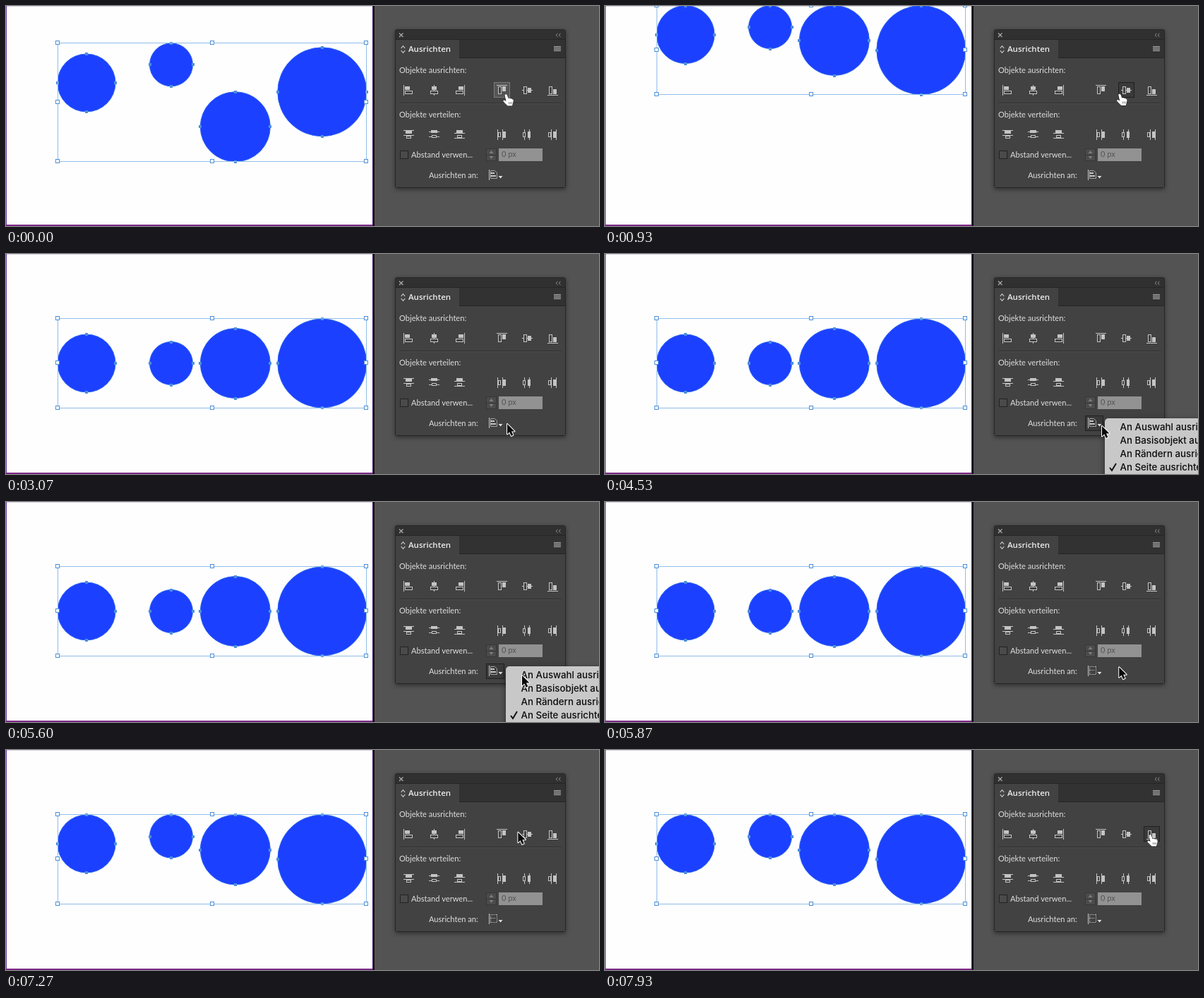
These frames come from a looping animation (840x312 px, 8 s). An HTML page with a canvas:

```html
<!DOCTYPE html>
<html lang="de">
<head>
<meta charset="utf-8">
<title>Ausrichten</title>
<style>
html, body { margin: 0; overflow: hidden; background: #535353; }
canvas { display: block; }
</style>
</head>
<body>
<canvas width="840" height="312"></canvas>
<script>
const ctx = document.querySelector('canvas').getContext('2d');
const LOOP = 8000;
const UI_FONT = '11.1px Lato, sans-serif';
const ICON = '#c4c4c4', PANEL = '#424242';

// Centre x, radius and scattered centre y of each circle
const circles = [[114, 41, 109], [234, 30.5, 83.3], [324.8, 49.5, 171.3], [447.8, 63, 121.8]];

// Pointer path: time, x, y
const pointerPath = [
  [0, 708, 125], [500, 708, 125], [1250, 742, 124], [2550, 742, 124],
  [3070, 710, 241], [3400, 704, 245], [3600, 704, 244], [4530, 704, 244],
  [4900, 721, 286], [5150, 728, 288], [5550, 731, 246], [5750, 731, 246],
  [6400, 700, 115], [7050, 700, 115], [7600, 772, 120], [LOOP, 772, 120]
];
const presses = [[0, 130], [2060, 2200], [6740, 6870]];
const MENU_OPEN = 3800, MENU_CLOSE = 5720;

const buttons = [];
[[119, alignIcon], [182, distributeIcon]].forEach(([y, icon], row) =>
  [570, 606, 642, 702, 738, 774].forEach((x, i) =>
    buttons.push({ x, y, icon, edge: i % 3, flip: (i < 3) === (row === 0) })));

const hand = new Path2D('M-1.5 1.5Q0-1.5 2 1.5L3.5 6Q5.5 4.8 6.5 6.5Q8.3 5.6 9 7.4Q11 7 10.8 9.5L10 13L9 16.5H2.5L-3.5 10.5Q-4 8 -1.5 8.8L.5 10Z');
const arrow = new Path2D('M0 0V14.5L3.3 11.4L5.7 17L8.4 15.8L6 10.4H10.5Z');

function rect(x, y, w, h, color) {
  ctx.fillStyle = color;
  ctx.fillRect(x, y, w, h);
}

function frame(x, y, w, h, color) {
  ctx.strokeStyle = color;
  ctx.lineWidth = 1;
  ctx.strokeRect(x + .5, y + .5, w - 1, h - 1);
}

function text(string, x, y, font = UI_FONT, color = '#dedede') {
  ctx.font = font;
  ctx.fillStyle = color;
  ctx.fillText(string, x, y);
}

function stroke(d, color, width = 1) {
  ctx.strokeStyle = color;
  ctx.lineWidth = width;
  ctx.stroke(new Path2D(d));
}

function fill(d, color) {
  ctx.fillStyle = color;
  ctx.fill(new Path2D(d));
}

// Bar of an icon, relative to the button centre; flip swaps the axes
function bar(b, x, y, w, h, hollow) {
  const box = b.flip ? [b.x + y, b.y + x, h, w] : [b.x + x, b.y + y, w, h];
  rect(...box, hollow ? PANEL : ICON);
  if (hollow) frame(...box, ICON);
}

function alignIcon(b) {
  bar(b, -7, [-7, 0, 7][b.edge], 15, 1);
  const shape = (x, length, hollow) =>
    bar(b, x, [-5, -(length >> 1), 6 - length][b.edge], 5, length, hollow);
  shape(b.flip ? 1 : -5, 11, true);
  shape(b.flip ? -5 : 1, 7, false);
}

function distributeIcon(b) {
  [0, 1].forEach(i => {
    const line = -6 + 2 * b.edge + 7 * i;
    const hollow = b.flip ? i === 0 : i === 1;
    bar(b, -7, line, 15, 1);
    bar(b, hollow ? -3 : -4, line + [1, -2, -4][b.edge], hollow ? 7 : 9, 4, hollow);
  });
}

function pointerAt(t) {
  const i = pointerPath.findIndex(p => p[0] > t);
  const [t0, x0, y0] = pointerPath[i - 1], [t1, x1, y1] = pointerPath[i];
  const u = (t - t0) / (t1 - t0), k = u * u * (3 - 2 * u);
  return [x0 + (x1 - x0) * k, y0 + (y1 - y0) * k];
}

function circleY(t, r, startY) {
  if (t < presses[0][1]) return startY;
  if (t < presses[1][1]) return r - .5;
  if (t < presses[2][1]) return 155;
  return 92 + r;
}

function drawArtboard(t) {
  rect(0, 0, 840, 312, '#535353');
  rect(0, 0, 520, 311, '#fefefe');
  rect(0, 0, 520, 1, '#d9d3df');
  rect(0, 0, 1, 312, '#6a3cae');
  rect(0, 310, 520, 2, '#7d2a88');
  rect(519, 0, 1, 312, '#4a2470');
  rect(520, 0, 2, 312, '#0c0a0e');

  const placed = circles.map(([x, r, y]) => [x, circleY(t, r, y), r]);
  for (const [x, y, r] of placed) {
    ctx.beginPath();
    ctx.arc(x, y, r, 0, 2 * Math.PI);
    ctx.fillStyle = '#1c40ff';
    ctx.fill();
    ctx.strokeStyle = '#2f66f0';
    ctx.lineWidth = 1;
    ctx.stroke();
    for (const [dx, dy] of [[-r, 0], [r, 0], [0, -r], [0, r]])
      rect(Math.round(x + dx) - 2, Math.round(y + dy) - 2, 4, 4, '#4b8fdc');
  }

  const left = 73, right = 510;
  const top = Math.floor(Math.min(...placed.map(([, y, r]) => y - r)) - .5);
  const bottom = Math.floor(Math.max(...placed.map(([, y, r]) => y + r)));
  frame(left, top, right - left + 1, bottom - top + 1, '#8fbdea');
  const midX = 292, midY = top + bottom >> 1;
  for (const x of [left, midX, right])
    for (const y of [top, midY, bottom]) {
      if (x === midX && y === midY) continue;
      rect(x - 3, y - 3, 6, 6, '#fff');
      frame(x - 3, y - 3, 6, 6, '#4b90d8');
    }
}

function drawPanel(t, x, y, pressed) {
  ctx.save();
  ctx.shadowColor = 'rgba(0,0,0,.45)';
  ctx.shadowBlur = 6;
  ctx.shadowOffsetY = 2;
  ctx.fillStyle = '#262626';
  ctx.beginPath();
  ctx.roundRect(551, 33, 242, 225, 3);
  ctx.fill();
  ctx.restore();
  rect(552, 34, 240, 13, '#303030');
  rect(552, 48, 240, 25, '#323232');
  rect(552, 48, 90, 26, PANEL);
  rect(552, 74, 240, 183, PANEL);
  stroke('M557 38.5l5.5 5.5M562.5 38.5l-5.5 5.5', '#b0b0b0', 1.1);
  stroke('M781.5 39l-2.5 2.3 2.5 2.3M785.5 39l-2.5 2.3 2.5 2.3', '#929292');
  stroke('M559.7 60l2.8-3.4 2.8 3.4M559.7 63l2.8 3.4 2.8-3.4', '#d0d0d0', 1.1);
  for (let i = 0; i < 4; i++) rect(776, 57 + i * 2, 10, 1, '#b4b4b4');
  text('Ausrichten', 570, 65, '600 11.5px "Open Sans", sans-serif', '#ececec');
  text('Objekte ausrichten:', 557, 95);
  rect(557, 137, 231, 1, '#303030');
  rect(557, 138, 231, 1, '#4c4c4c');
  text('Objekte verteilen:', 557, 158);

  for (const b of buttons) {
    if (b === hovered(x, y)) {
      rect(b.x - 11, b.y - 11, 23, 22, pressed ? '#555' : '#3a3a3a');
      frame(b.x - 11, b.y - 11, 23, 22, pressed ? '#7c7c7c' : '#202020');
    }
    b.icon(b);
  }

  rect(558, 205, 12, 12, '#4a4a4a');
  frame(558, 205, 12, 12, '#222');
  text('Abstand verwen...', 574, 215);
  rect(680, 202, 15, 18, '#4b4b4b');
  frame(680, 202, 15, 18, '#373737');
  rect(680, 211, 15, 1, '#373737');
  fill('M687.5 205l3 4h-6zM687.5 217l3-4h-6z', '#7c7c7c');
  rect(698, 202, 62, 18, '#929292');
  text('0 px', 702, 214, UI_FONT, '#555');
  text('Ausrichten an:', 599, 244);
  drawTargetIcon(t, x, y);
}

function drawTargetIcon(t, x, y) {
  const menuOpen = t >= MENU_OPEN && t < MENU_CLOSE;
  if (menuOpen || (x > 680 && x < 706 && y > 229 && y < 250)) {
    rect(680, 229, 26, 22, '#3a3a3a');
    frame(680, 229, 26, 22, '#202020');
  }
  rect(684, 232, 1, 15, ICON);
  if (t < MENU_CLOSE) {
    stroke('M686.5 233.5h6l3 3v8h-9z', '#a2a2a2');
    rect(686, 236, 6, 2, ICON);
    rect(686, 240, 8, 2, ICON);
  } else {
    ctx.setLineDash([1, 1]);
    stroke('M686 233.5h10M686 238.5h7M686 244.5h10M686.5 233v12M695.5 233v12', ICON);
    ctx.setLineDash([]);
  }
  fill('M697.5 241h6l-3 3.5z', '#dedede');
}

function drawMenu() {
  ctx.save();
  ctx.shadowColor = 'rgba(0,0,0,.5)';
  ctx.shadowBlur = 9;
  ctx.shadowOffsetY = 3;
  ctx.fillStyle = '#c8c8c8';
  ctx.beginPath();
  ctx.roundRect(708, 233, 180, 100, 5);
  ctx.fill();
  ctx.restore();
  ['Auswahl', 'Basisobjekt', 'Rändern', 'Seite'].forEach((target, i) =>
    text(`An ${target} ausrichten`, 729.5, 250 + 19 * i, '500 13.3px Inter, sans-serif', '#0c0c0c'));
  stroke('M715 303l3 4 6-10', '#0c0c0c', 1.9);
}

function hovered(x, y) {
  return buttons.find(b => Math.abs(x - b.x) < 12 && y > b.y - 11 && y < b.y + 11);
}

function drawPointer(x, y, isHand) {
  ctx.save();
  ctx.translate(x, y);
  ctx.lineJoin = 'round';
  ctx.lineWidth = isHand ? 1 : 2;
  ctx.strokeStyle = isHand ? '#1a1a1a' : '#fff';
  ctx.fillStyle = isHand ? '#fff' : '#0a0a0a';
  const shape = isHand ? hand : arrow;
  ctx.stroke(shape);
  ctx.fill(shape);
  if (isHand) stroke('M4.4 11v3M6.4 11v3M8.3 11v3', '#555', .7);
  ctx.restore();
}

function draw(now) {
  const t = now % LOOP;
  const [x, y] = pointerAt(t);
  const pressed = presses.some(([start, end]) => t >= start && t < end);
  const menuOpen = t >= MENU_OPEN && t < MENU_CLOSE;
  drawArtboard(t);
  drawPanel(t, x, y, pressed);
  if (menuOpen) drawMenu();
  drawPointer(x, y, !menuOpen && Boolean(hovered(x, y)));
}

let start;
function tick(now) {
  start ??= now;
  draw(Math.max(0, now - start));
  requestAnimationFrame(tick);
}
draw(0);
requestAnimationFrame(tick);
</script>
</body>
</html>
```
